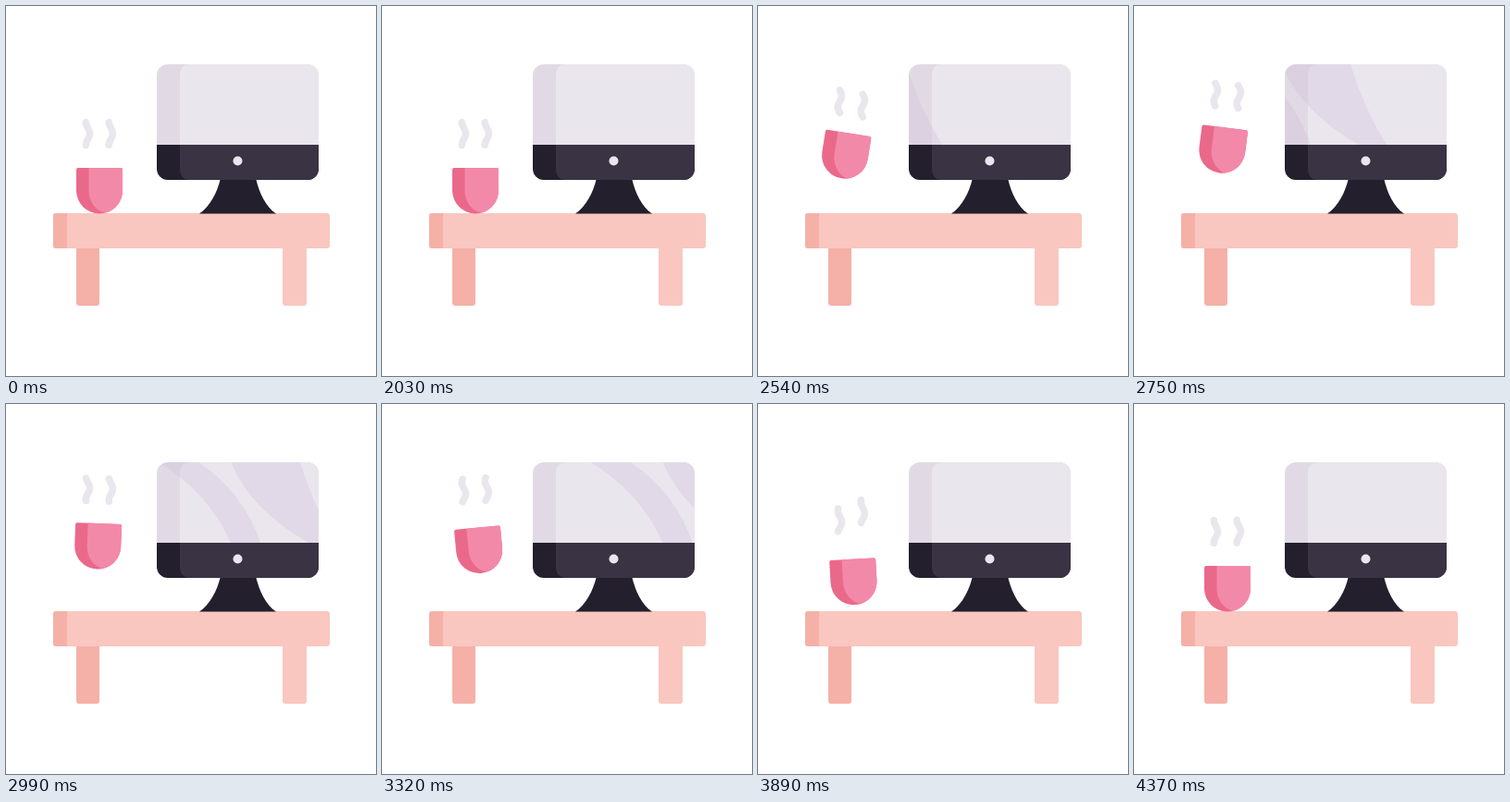
An HTML page for the animation above (4430 ms loop, 400x400 px).

```html
<!DOCTYPE html>
<html lang="en">
<head>
<meta charset="utf-8">
<title>Desk with floating cup</title>
<style>
  html, body { margin: 0; width: 100%; height: 100%; overflow: hidden; background: #fff; }
  svg { display: block; width: 100%; height: 100%; }
</style>
</head>
<body>
<svg viewBox="0 0 400 400">
  <defs>
    <clipPath id="frame"><rect x="163" y="63" width="175" height="125" rx="12"/></clipPath>
  </defs>

  <!-- table -->
  <path fill="#f5b0a7" d="M76 260H101V321q0 3-3 3H79q-3 0-3-3z"/>
  <path fill="#f9c7bf" d="M299 260H325V321q0 3-3 3H302q-3 0-3-3z"/>
  <rect x="51" y="224" width="299" height="38" rx="3" fill="#f9c7bf"/>
  <path fill="#f5b0a7" d="M66 224H54q-3 0-3 3V259q0 3 3 3H66z"/>

  <!-- monitor -->
  <path fill="#231f2c" d="M232 186C228 203 220 217 209 224.5H292C281 217 274 203 270 186z"/>
  <g clip-path="url(#frame)">
    <rect x="163" y="63" width="175" height="88" fill="#e1dae4"/>
    <path fill="#eae6ed" d="M338 63H200q-12 0-12 12V151H338z"/>
    <g id="shine" fill="#c9b8d6" opacity=".28">
      <path d="M243 63Q265 115 327 150H357Q332 110 318 63z"/>
      <path d="M165 63Q218 95 243 150H275Q256 95 208 63z"/>
    </g>
    <rect x="163" y="150" width="175" height="38" fill="#231f2c"/>
    <path fill="#393343" d="M188 150H338V188H200q-12 0-12-12z"/>
  </g>
  <circle cx="250.5" cy="167.5" r="5" fill="#eae6ed"/>

  <!-- cup and steam -->
  <g id="cup">
    <path fill="#ea698b" d="M76 177q0-2 2-2H124q2 0 2 2V199.5a25 25 0 0 1-50 0z"/>
    <path fill="#f389a8" d="M89.5 175H124q2 0 2 2V199.5c0 11.7-8 21.7-18.8 24.3C97 221.3 89.5 211.5 89.5 199.5z"/>
  </g>
  <g fill="none" stroke="#eae6ed" stroke-width="7.5" stroke-linecap="round" stroke-linejoin="round">
    <path id="steamLeft"/>
    <path id="steamRight"/>
  </g>
</svg>
<script>
const LOOP = 4430, START = 2030;
const $ = id => document.getElementById(id);
const progress = (t, from, to) => Math.min(1, Math.max(0, (t - from) / (to - from)));
const smooth = p => (1 - Math.cos(Math.PI * p)) / 2;

// Height above the table; a larger lag trails behind the cup.
function lift(t, lag = 0) {
  const rise = 1 - (1 - progress(t - lag * 0.6, START, 3080)) ** 2.5;
  const fall = smooth(progress(t - lag, 3100, 4170));
  return 46 * rise * (1 - fall);
}

// Sway from -1 to 1, eased through its two extremes.
function sway(t) {
  if (t < 2540) return smooth(progress(t, START, 2540));
  if (t < 3570) return 1 - 1.84 * smooth(progress(t, 2540, 3570));
  return -0.84 * (1 - smooth(progress(t, 3570, 4150)));
}

function steam(x, up, bend) {
  let d = "";
  for (let i = 0; i <= 16; i++) {
    const px = x - 2.1 * Math.cos(2 * Math.PI * i / 16 + bend);
    const py = 125.7 - up + 24.6 * i / 16;
    d += (i ? "L" : "M") + px.toFixed(2) + " " + py.toFixed(2);
  }
  return d;
}

const shineStops = [[2380, -225], [2540, -158], [2990, 0], [3590, 110], [3860, 180]];
function shineX(t) {
  let x = shineStops[0][1];
  for (let i = 1; i < shineStops.length; i++) {
    const [t0, x0] = shineStops[i - 1], [t1, x1] = shineStops[i];
    x += (x1 - x0) * progress(t, t0, t1);
  }
  return x;
}

function draw() {
  const t = performance.now() % LOOP, s = sway(t), bend = s * Math.PI / 2;
  $("cup").setAttribute("transform", `translate(0 ${-lift(t)}) rotate(${9 * s} 101 155)`);
  $("steamLeft").setAttribute("d", steam(88.4, lift(t, 95), bend));
  $("steamRight").setAttribute("d", steam(113.3, lift(t, 240), bend));
  $("shine").setAttribute("transform", `translate(${shineX(t)} 0)`);
  requestAnimationFrame(draw);
}
draw();
</script>
</body>
</html>
```
